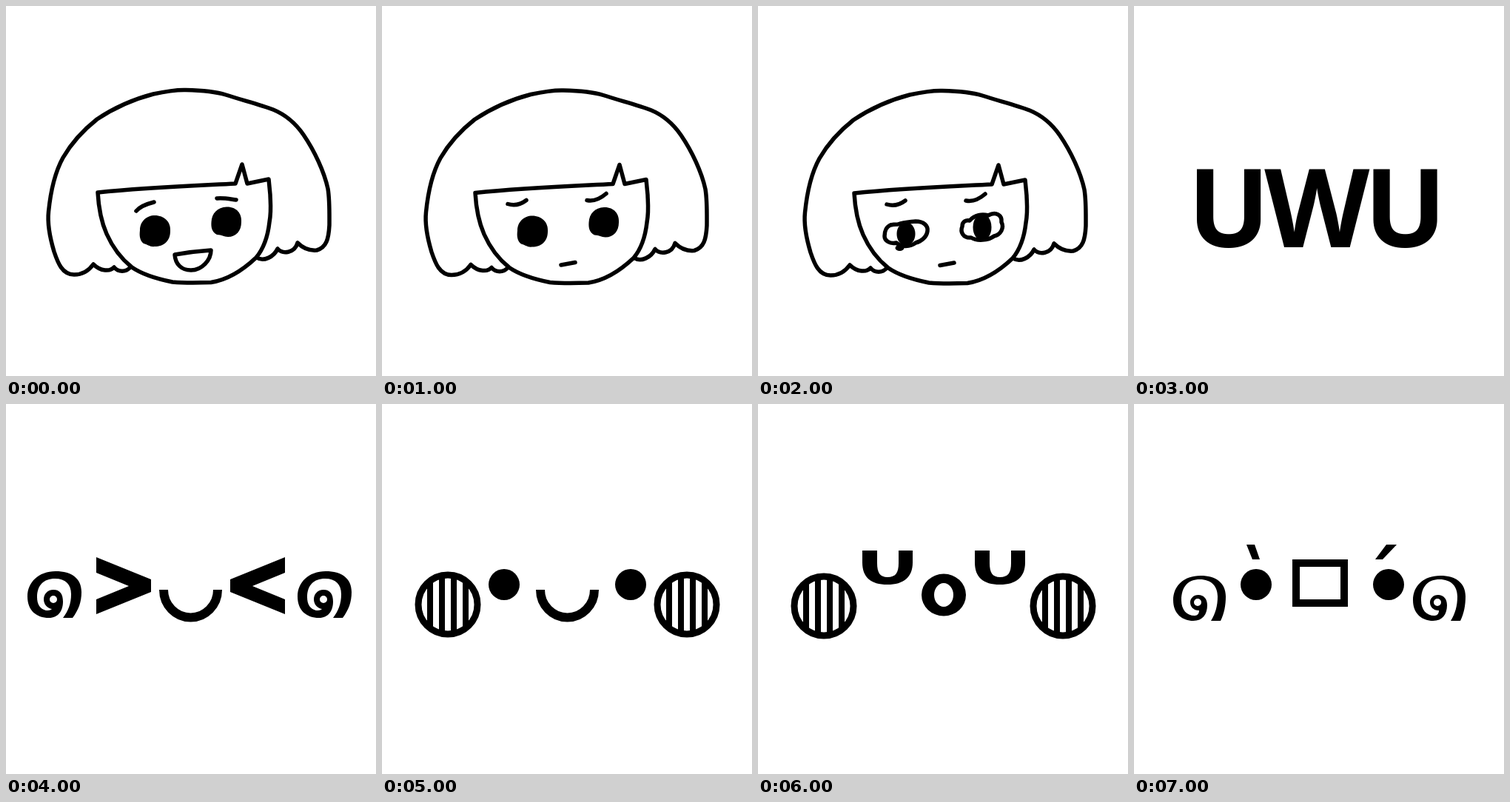
An HTML page for the animation above (8 s loop, 500x500 px).

```html
<!DOCTYPE html>
<html lang="en">
<head>
<meta charset="utf-8">
<title>Faces</title>
<style>
  html, body { margin: 0; width: 100%; height: 100%; overflow: hidden; background: #fff; }
  svg { display: block; width: 100%; height: 100%; }
  .pose { visibility: hidden; animation: show 8s step-end infinite; animation-delay: calc((var(--i) - 8) * 1s); }
  @keyframes show { 0% { visibility: visible; } 12.5%, 100% { visibility: hidden; } }
  .line { fill: none; stroke: #000; stroke-width: 5.5; stroke-linecap: round; stroke-linejoin: round; }
  .dot { fill: #000; stroke: none; }
  text { font: bold 147px "Open Sans", "Noto Sans", sans-serif; letter-spacing: -.05em; }
</style>
</head>
<body>
<svg viewBox="0 0 500 500">
  <defs>
    <g id="head">
      <path d="M168 353C162 360 152 360 146 353C141 359 128 359 118 349C111 359 101 363 92 363C76 363 70 347 65 332C59 312 56 292 57.5 278C60 253 66 225 77 205C88 186 104 168 123 153C147 137 172 126 199 119C213 116 228 113 243 113.5C263 114 281 115 297 120C318 127 343 133 361 140C378 147 391 158 402 174C417 196 430 224 435 247C437.5 262 437 280 437 296C436 315 433 326 420 330C409 331 401 327 394 320C390 334 374 336 367 328C362 339 348 346 339 340"/>
      <path d="M124 252C125 270 128 290 136 308C144 326 155 341 170 353C186 364 205 369 225 373C243 374.5 262 374 277 373.5C300 370 320 357 338 340C348 328 354 310 356 292C359 275 357 262 357 255L355 234L326 240L319 214L310 240C250 243 190 245 124 252Z"/>
    </g>
    <g id="round-eyes" class="dot">
      <path d="M201 283C214 283 223 292 222 304C222 318 213 325 201 325C195 326 191 322 186 321C181 317 180 311 181 303C181 291 190 283 201 283Z"/>
      <path d="M298 271.5C311 271 319 280 318 292C318 304 311 312 300 312C294 312 292 309 285 309C278 305 277 299 277.5 292C278 280 286 272 298 271.5Z"/>
    </g>
    <path id="sad-brows" d="M174 268C182 270.500 191 269 199 263M281 263C291 265 300 260 307 254"/>
    <path id="flat-mouth" d="M246 350.5L265 347"/>
    <path id="bold-curl" fill-rule="evenodd" d="M90 289C98 278 102 268 102 254C102 236 89 226 67 226C44 226 29 241 29 260C29 279 41 289 58 289C71 289 77 279 77 267C77 257 73 251 64 251C56 251 51 257 51 264C51 271 56 276 62 277C60 279 57 279 54 279C46 277 42 271 42 261C42 245 51 236 66 236C81 236 88 244 88 257C88 270 84 280 77 289ZM59 264a5 5 0 1 0 10 0a5 5 0 1 0-10 0Z"/>
    <path id="thin-curl" fill-rule="evenodd" d="M117 293C122 283 124 272 124 260C124 242 111 232 90 232C67 232 53 246 53 265C53 284 66 293 80 293C93 293 99 284 99 272C99 263 94 258 87 258C80 258 76 263 76 268C76 274 80 279 88 279C88 283 86 286 82 286C71 286 64 278 64 265C64 247 73 237 89 237C104 237 113 246 113 260C113 273 110 283 104 293ZM81 268a5 5 0 1 0 10 0a5 5 0 1 0-10 0Z"/>
    <path id="arrow" d="M122 207L196 237V254L122 284V264L166 246L122 228Z"/>
    <path id="smile" d="M213 251A36.5 37.5 0 0 0 286 251" fill="none" stroke="#000" stroke-width="12"/>
    <path id="lid" d="M141 198H161V215C161 228 165 234 175 234C186 234 190 228 190 215V198H209V214C209 234 197 244 175 244C152 244 141 234 141 214Z"/>
    <g id="cheek" fill="none" stroke="#000">
      <circle cx="89" cy="273" r="40" stroke-width="9"/>
      <path d="M65 241V305M81 234V312M97 234V312M113 241V305" stroke-width="8"/>
    </g>
    <g id="cheeks">
      <use href="#cheek"/>
      <use href="#cheek" x="323"/>
    </g>
  </defs>

  <g class="pose line" style="--i:0">
    <use href="#head"/>
    <use href="#round-eyes"/>
    <path d="M176 277C182 270 192 267 200 265M285 260C294 259 303 261 311 262"/>
    <path d="M228 336C245 333 262 331 277 330C277 343 265 357 250 357C237 357 229 349 228 336Z"/>
  </g>

  <g class="pose line" style="--i:1">
    <g transform="translate(2 .5)">
      <use href="#head"/>
      <use href="#round-eyes"/>
    </g>
    <g transform="translate(-4 -.5)">
      <use href="#sad-brows"/>
      <use href="#flat-mouth"/>
    </g>
  </g>

  <g class="pose line" style="--i:2">
    <use href="#head" x="6" y="1"/>
    <use href="#sad-brows"/>
    <use href="#flat-mouth"/>
    <path d="M189 295C198 292 205 292 213 291C224 291 230 297 229 304C228 312 221 318 213 320C206 326 193 326 187 320C178 322 171 317 171 311C171 304 174 298 179 296C183 295 186 295 189 295Z"/>
    <path d="M286 290C293 282 303 281 311 283C322 277 330 283 329 292C333 300 328 309 319 311C311 317 296 318 288 313C277 314 273 305 276 298C276 291 281 289 286 290Z"/>
    <g class="dot">
      <ellipse cx="200" cy="308" rx="12.5" ry="16"/>
      <ellipse cx="303" cy="299" rx="12.5" ry="18"/>
      <ellipse cx="191.5" cy="327" rx="6" ry="4"/>
    </g>
  </g>

  <g class="pose" style="--i:3">
    <text x="72.5" y="326">UWU</text>
  </g>

  <g class="pose" style="--i:4">
    <use href="#bold-curl"/>
    <use href="#bold-curl" x="365"/>
    <use href="#arrow"/>
    <use href="#arrow" transform="matrix(-1 0 0 1 499 0)"/>
    <use href="#smile"/>
  </g>

  <g class="pose" style="--i:5">
    <use href="#cheeks" y="-2"/>
    <circle cx="165" cy="244" r="21"/>
    <circle cx="336" cy="244" r="21"/>
    <use href="#smile" x="1"/>
  </g>

  <g class="pose" style="--i:6">
    <use href="#cheeks"/>
    <use href="#lid"/>
    <use href="#lid" x="152"/>
    <path fill-rule="evenodd" d="M221 258a30 28.5 0 1 0 60 0a30 28.5 0 1 0-60 0ZM238 258a13 16 0 1 0 26 0a13 16 0 1 0-26 0Z"/>
  </g>

  <g class="pose" style="--i:7">
    <use href="#thin-curl"/>
    <use href="#thin-curl" x="324"/>
    <circle cx="165" cy="244" r="21"/>
    <circle cx="344" cy="244" r="21"/>
    <path d="M152 190H163L170 210H160ZM341 190H355L336 210H326Z"/>
    <rect x="219" y="215" width="65" height="54" fill="none" stroke="#000" stroke-width="10"/>
  </g>
</svg>
</body>
</html>
```
